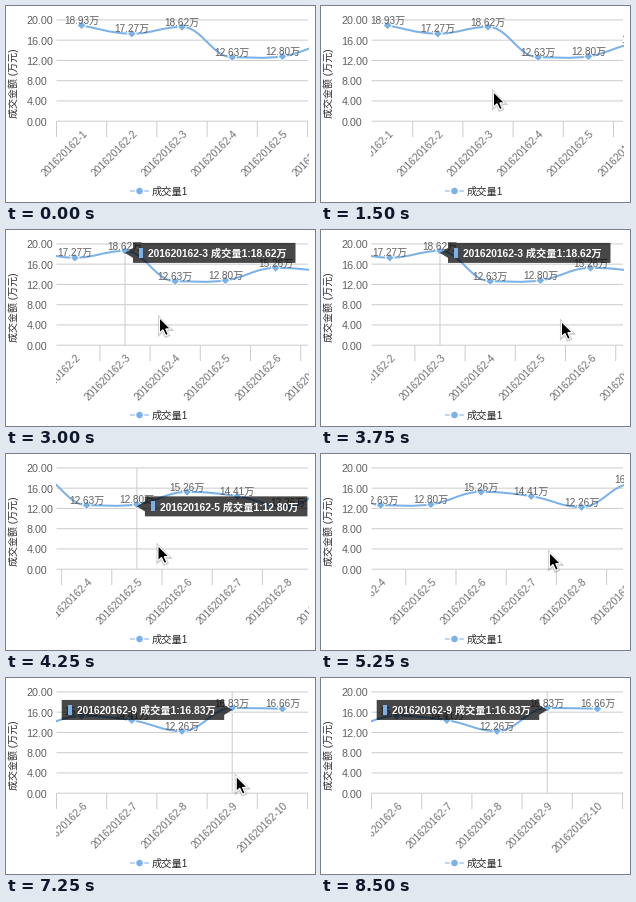
A matplotlib script that plays this animation: 309x196 px, repeating every 9750 ms.

```python
import numpy as np
import matplotlib.pyplot as plt
from matplotlib.animation import FuncAnimation
from matplotlib.patches import Circle, PathPatch, Polygon, Rectangle
from matplotlib.path import Path

W, H, DPI = 309, 196, 64
FRAMES, STEP_MS = 39, 250
PT = 72 / DPI  # points per pixel

BLUE, GRID, GREY, DARK = "#7ab1e8", "#cccccc", "#606060", "#2b2b2b"
LEFT, RIGHT, TOP, BOTTOM = 50.5, 302, 13.9, 115.2
FIRST_X, GAP, MAX_SCROLL = 75.6, 50.2, 251
VALUES = np.array([18.93, 17.27, 18.62, 12.63, 12.80,
                   15.26, 14.41, 12.26, 16.83, 16.66])
YS = BOTTOM - VALUES * (BOTTOM - TOP) / 20
NAMES = [f"201620162-{i + 1}" for i in range(len(VALUES))]
TIP_W, TIP_H, ARROW = 162.5, 20, 8

# press step, release step, press x, press y, distance, last step of the tip
DRAGS = [(5, 9, 181, 85, 36, 0), (9, 11, 145, 85, 21, 15),
         (15, 16, 240, 91, 88.5, 17), (17, 19, 151.5, 91, 21, 19),
         (21, 25, 228, 98, 65.5, 26), (26, 30, 277, 97, 63, FRAMES)]
SHOWN, HIDDEN = 1, 34
ARROW_SHAPE = 1.08 * np.array([(0.4, 0.4), (0.4, 14.6), (3.7, 11.6),
                               (6.2, 17), (8.7, 16), (6.3, 10.8), (10.8, 10.8)])

plt.rcParams["font.family"] = ["Liberation Sans", "Noto Sans CJK JP"]
fig = plt.figure(figsize=(W / DPI, H / DPI), dpi=DPI, facecolor="white")
ax = fig.add_axes([0, 0, 1, 1])


def scroll_at(n):
    moved = sum(d * np.clip((n - a) / (b - a), 0, 1)
                for a, b, _, _, d, _ in DRAGS)
    return min(moved, MAX_SCROLL)


def pointer_at(n):
    """The pointer drags the chart along, then heads for the next press."""
    keys = [(SHOWN, 290, 176), (3, DRAGS[0][2], DRAGS[0][3])]
    for a, b, x, y, d, _ in DRAGS:
        keys += [(a, x, y), (b, x - d, y + 1)]
    steps, xs, ys = np.array(keys + [(31, 252, 102)]).T
    return np.interp(n, steps, xs), np.interp(n, steps, ys)


def selected_at(n):
    """Index of the point pressed last, while its tip is up."""
    for a, _, x, _, _, until in reversed(DRAGS):
        if a < n <= until:
            return int((x + scroll_at(a) - FIRST_X) / GAP)
    return None


def text(x, y, s, color=GREY, size=10, clip=None, **kw):
    kw.setdefault("va", "baseline")
    t = ax.text(x, y, s, color=color, fontsize=size * PT, **kw)
    if clip is not None:
        t.set_clip_on(True)
        t.set_clip_path(clip)


def line(xs, ys, color=GRID, width=1, clip=None, z=1):
    ln, = ax.plot(xs, ys, color=color, lw=width * PT, zorder=z,
                  solid_capstyle="butt", snap=False)
    if clip is not None:
        ln.set_clip_path(clip)


def shape(patch, clip=None):
    ax.add_patch(patch)
    if clip is not None:
        patch.set_clip_path(clip)


def is_turn(i):
    if i in (0, len(YS) - 1):
        return False
    near = YS[i - 1], YS[i + 1]
    return YS[i] >= max(near) or YS[i] <= min(near)


def curve(xs):
    """Smooth path whose handles lie flat at peaks and dips."""
    pts = np.column_stack([xs, YS])
    last = len(pts) - 1
    slope = [0.2 * (pts[min(i + 1, last)] - pts[max(i - 1, 0)])
             for i in range(last + 1)]
    for i, s in enumerate(slope):
        if is_turn(i):
            s[1] = 0
    verts = [pts[0]]
    for i in range(last):
        verts += [pts[i] + slope[i], pts[i + 1] - slope[i + 1], pts[i + 1]]
    return Path(verts, [Path.MOVETO] + [Path.CURVE4] * (3 * last))


def draw_frame():
    for v in range(0, 21, 4):
        y = BOTTOM - v * (BOTTOM - TOP) / 20
        line([LEFT, RIGHT], [y, y])
        text(20.4, y + 4.4, f"{v:.2f}", size=10.7)
    text(8, 76.8, "成交金额 (万元)", DARK, rotation=90, ha="center", va="center")
    line([124, 143], [185, 185], BLUE)
    shape(Circle((133.5, 185), 4, fc=BLUE, ec="white", lw=1.4 * PT, zorder=2))
    text(146, 188.7, "成交量1", DARK, size=10.2)


def draw_series(xs, scroll):
    inner = Rectangle((50, 0), 252.5, H, transform=ax.transData)
    names = inner if scroll else Rectangle((0, 0), 302.5, H,
                                           transform=ax.transData)
    for i in range(len(xs) + 1):
        x = xs[0] + (i - 0.5) * GAP
        line([x, x], [BOTTOM, 131], clip=inner)
    shape(PathPatch(curve(xs), fc="none", ec=BLUE, lw=2 * PT, zorder=2), inner)
    for x, y, v, name in zip(xs, YS, VALUES, NAMES):
        if not -20 < x < W + 45:
            continue
        diamond = [(x, y - 4.5), (x - 4.5, y), (x, y + 4.5), (x + 4.5, y)]
        shape(Polygon(diamond, fc=BLUE, ec="white", lw=PT, zorder=3), inner)
        text(x, y - 1.4, f"{v:.2f}万", clip=inner, ha="center", zorder=4)
        text(x + 6.3, 128, name, "#727272", 10.2, names, rotation=45,
             rotation_mode="anchor", ha="right")


def draw_tip(x, i):
    line([x, x], [TOP, BOTTOM], z=2.5)
    y = YS[i]
    side = -1 if x + ARROW + TIP_W > W else 1
    edge = x + side * ARROW
    box = edge if side > 0 else edge - TIP_W
    top = y - 8
    far = edge + side * TIP_W
    outline = [(x, y + 2), (edge, y - 3), (edge, top), (far, top),
               (far, top + TIP_H), (edge, top + TIP_H), (edge, y + 7)]
    shape(Polygon(outline, fc="black", ec="none", alpha=0.72, zorder=5))
    shape(Rectangle((box + 6, top + 5), 4, 10, fc=BLUE, ec="none", zorder=6))
    text(box + 15, top + 14.3, f"{NAMES[i]} 成交量1:{VALUES[i]:.2f}万", "white",
         size=10.2, weight="bold", zorder=6)


def draw_pointer(n):
    pts = ARROW_SHAPE + pointer_at(n)
    shape(Polygon(pts + (0, 0.6), fc="none", ec="black", alpha=0.2,
                  lw=3 * PT, zorder=7))
    shape(Polygon(pts, fc="black", ec="white", lw=1.2 * PT,
                  joinstyle="miter", zorder=8))


def draw(n):
    ax.clear()
    ax.set(xlim=(0, W), ylim=(H, 0))
    ax.axis("off")
    scroll = scroll_at(n)
    xs = FIRST_X + GAP * np.arange(len(VALUES)) - scroll
    draw_frame()
    draw_series(xs, scroll)
    i = selected_at(n)
    if i is not None:
        draw_tip(xs[i], i)
    if SHOWN <= n < HIDDEN:
        draw_pointer(n)
    return []


anim = FuncAnimation(fig, draw, frames=FRAMES, init_func=lambda: [],
                     interval=STEP_MS, repeat=True, repeat_delay=0)
plt.show()
```
